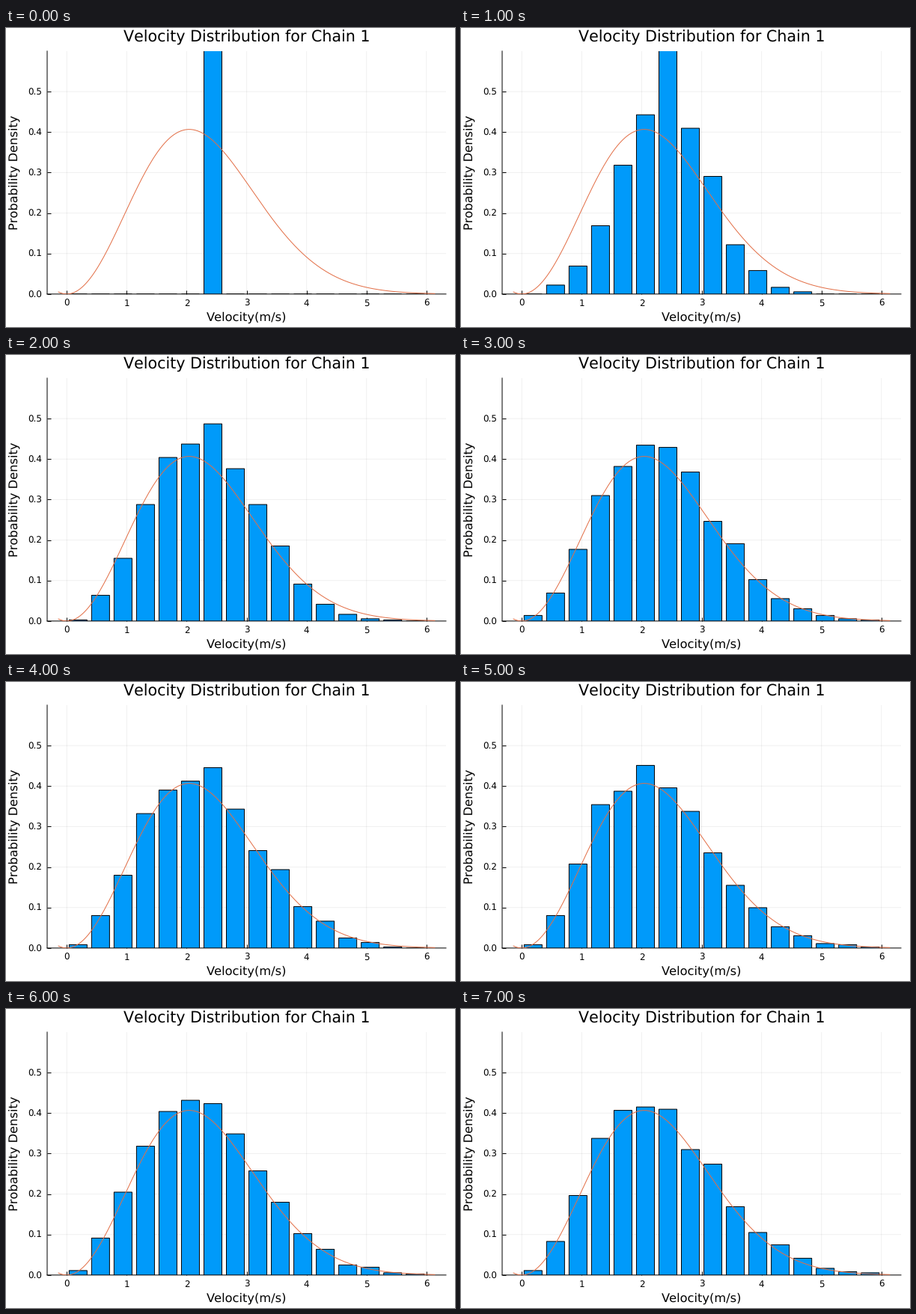
Animation of 600x400 px, one loop 8 s. Source, as a matplotlib script:

```python
import numpy as np
import matplotlib.pyplot as plt
from matplotlib.animation import FuncAnimation

W, H = 600, 400
LEFT, RIGHT, TOP, BOTTOM = 55, 588, 30.9, 355.9
ORIGIN, UNIT = 81.3, 80.08  # pixel of x = 0, pixels per m/s

FRAMES = 8
PARTICLES = 1024
BINS = 16
BIN_STEP = 6 / BINS
DENSITY_WIDTH = 6 / 17
THERMAL = 1.4436                   # equilibrium spread per axis
START_SPEED = THERMAL * 3**0.5     # same energy as equilibrium
COLLISION_RATE = 2
DRIFT_DECAY = 0.36
ROUGHNESS = 0.5


def px(n):
    """Pixels to points at 100 dpi."""
    return n * 0.72


def to_x(pixel):
    return (pixel - ORIGIN) / UNIT


def maxwell(v):
    return np.sqrt(2 / np.pi) * v**2 / THERMAL**3 * np.exp(-v**2 / (2 * THERMAL**2))


def scattered(v, t):
    """Speed density when the remaining drift is blurred by thermal motion."""
    drift = np.exp(-DRIFT_DECAY * t)
    m = START_SPEED * np.sqrt(drift)
    s = max(THERMAL * np.sqrt(1 - drift), 0.01)
    bell = np.exp(-((v - m) / s)**2 / 2) - np.exp(-((v + m) / s)**2 / 2)
    return v / (m * s * np.sqrt(2 * np.pi)) * bell


def histogram(t, noise):
    """Counts per bin: untouched particles stay in the starting bin."""
    untouched = np.exp(-COLLISION_RATE * t)
    n = (1 - untouched) * scattered(centers, t) * BIN_STEP * PARTICLES
    n += ROUGHNESS * np.sqrt(n) * noise
    n[int(START_SPEED / BIN_STEP)] += untouched * PARTICLES
    return np.maximum(np.round(n), 0)


centers = (np.arange(BINS) + 0.5) * BIN_STEP
noise = np.random.default_rng(4).normal(size=(FRAMES, BINS))

plt.rcParams.update({
    "font.family": "DejaVu Sans",
    "path.snap": False,
    "text.hinting": "none",
    "text.kerning_factor": 6,  # practically no kerning
})
fig = plt.figure(figsize=(6, 4), dpi=100, facecolor="white")
ax = fig.add_axes([LEFT / W, 1 - BOTTOM / H, (RIGHT - LEFT) / W, (BOTTOM - TOP) / H])
ax.set_xlim(to_x(LEFT), to_x(RIGHT))
ax.set_ylim(0, 0.6)
ax.set_xticks(range(7))
ax.set_yticks(np.arange(6) / 10)
ax.set_axisbelow(True)
ax.grid(color="black", alpha=0.06, linewidth=px(1))
ax.tick_params(direction="in", length=px(5), width=px(1), pad=px(7.3),
               labelsize=px(11.85))
for side, spine in ax.spines.items():
    spine.set_visible(side in ("left", "bottom"))
    spine.set_linewidth(px(1))
    spine.set_zorder(0.6)


def label(x, y, text, size, angle=0):
    fig.text(x / W, 1 - y / H, text, fontsize=px(size), rotation=angle,
             rotation_mode="anchor", ha="center", va="baseline")


label(322, 19, "Velocity Distribution for Chain 1", 20.7)
label(322, 392, "Velocity(m/s)", 16.25)
label(16, 193.5, "Probability Density", 16.25, angle=90)

bars = ax.bar(centers, np.zeros(BINS), width=0.8 * BIN_STEP, color="#009afa",
              edgecolor="black", linewidth=px(1), zorder=2)
speed = np.linspace(to_x(70.1), to_x(572.9), 300)
ax.plot(speed, maxwell(speed), color="#e36f47", linewidth=px(1), zorder=3)


def draw(i):
    for bar, n in zip(bars, histogram(i, noise[i])):
        bar.set_height(n / PARTICLES / DENSITY_WIDTH)
    return list(bars)


anim = FuncAnimation(fig, draw, frames=FRAMES, interval=1000,
                     repeat=True, repeat_delay=0, blit=False)
plt.show()
```
